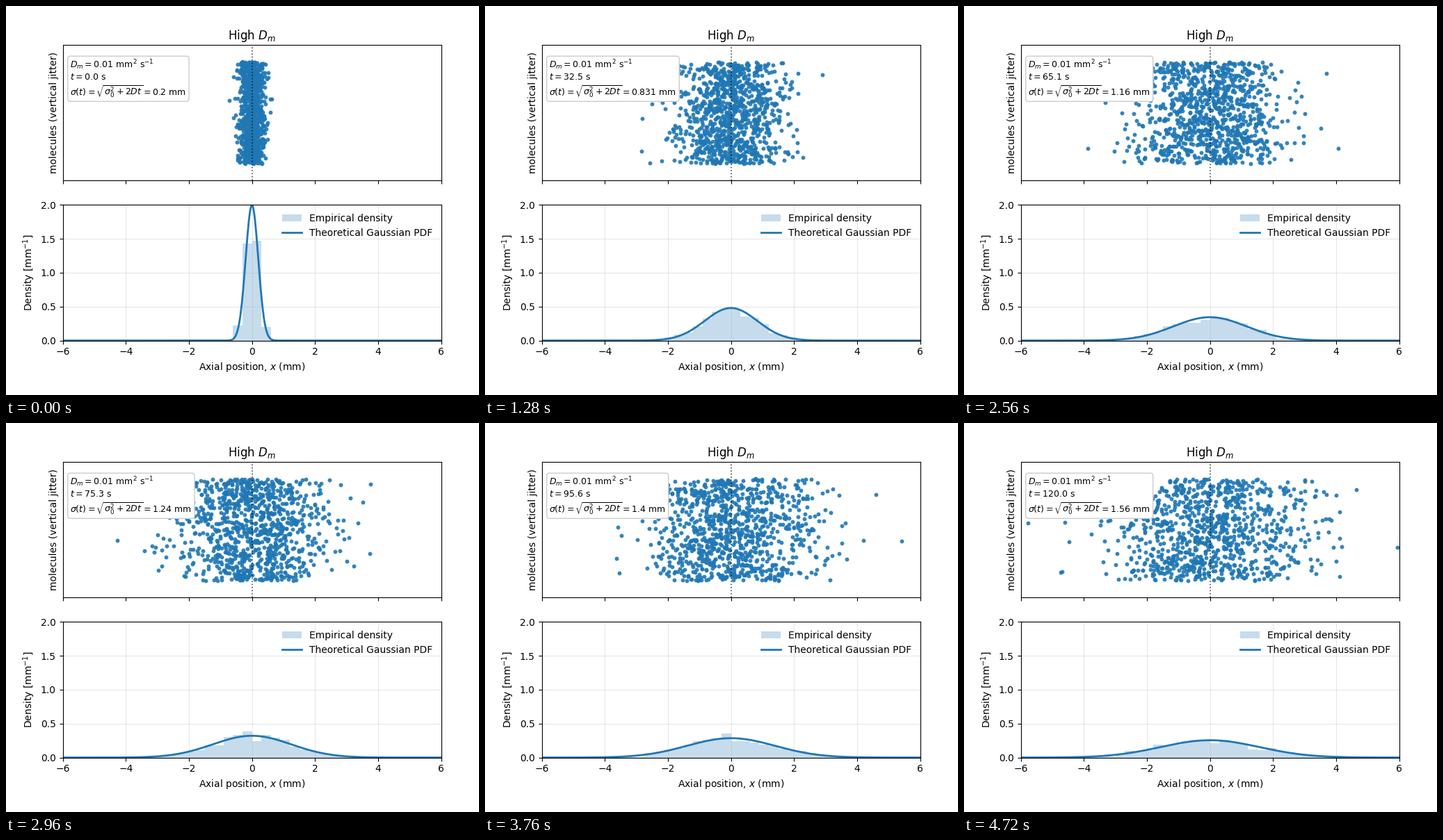
A matplotlib script that plays this animation: 680x560 px, repeating every 4.8 s.

```python
import numpy as np
import matplotlib.pyplot as plt
from matplotlib.animation import FuncAnimation

D = 0.01          # mm^2 / s
SIGMA0 = 0.2      # mm
T_END = 120.0     # s
FRAMES = 60
COUNT = 1000
JITTER = 0.75
COLOR = "tab:blue"

times = np.linspace(0, T_END, FRAMES)
sigmas = np.sqrt(SIGMA0**2 + 2 * D * times)
edges = np.linspace(-6, 6, 41)
grid_x = np.linspace(-6, 6, 601)

# Fresh positions and jitter for every time step, drawn once so loops repeat
rng = np.random.default_rng(42)
clouds = [
    np.column_stack([rng.normal(0, s, COUNT), rng.uniform(-JITTER, JITTER, COUNT)])
    for s in sigmas
]


def gaussian(x, s):
    return np.exp(-x**2 / (2 * s**2)) / (s * np.sqrt(2 * np.pi))


def density(x):
    counts, _ = np.histogram(x, bins=edges)
    return counts / (len(x) * np.diff(edges))


def caption(t, s):
    return (
        f"$D_m = {D:.3g}$ mm$^2$ s$^{{-1}}$\n"
        f"$t = {t:.1f}$ s\n"
        rf"$\sigma(t) = \sqrt{{\sigma_0^2 + 2Dt}} = {s:.3g}$ mm"
    )


fig, (top, low) = plt.subplots(2, 1, figsize=(6.8, 5.6), dpi=100, sharex=True)
fig.subplots_adjust(left=0.12, right=0.92, top=0.9, bottom=0.14, hspace=0.18)

dots = top.scatter(*clouds[0].T, s=18, color=COLOR, alpha=0.9, linewidths=0)
top.axvline(0, color="k", ls=":", lw=1.2, alpha=0.7)
top.set_ylim(-1, 1)
top.set_yticks([])
top.set_ylabel("molecules (vertical jitter)")
top.set_title("High $D_m$")
note = top.text(
    0.02, 0.9, "", transform=top.transAxes, fontsize=9, va="top", ha="left",
    bbox=dict(boxstyle="round,pad=0.3", facecolor="white", edgecolor="0.8"),
)

bars = low.bar(
    edges[:-1], density(clouds[0][:, 0]), width=np.diff(edges), align="edge",
    color=COLOR, alpha=0.25, linewidth=0, label="Empirical density",
)
curve, = low.plot(
    grid_x, gaussian(grid_x, SIGMA0), color=COLOR, lw=2,
    label="Theoretical Gaussian PDF",
)
low.set_xlim(-6, 6)
low.set_ylim(0, 2)
low.set_yticks(np.arange(0, 2.1, 0.5))
low.set_xlabel("Axial position, $x$ (mm)")
low.set_ylabel("Density [mm$^{-1}$]")
low.grid(alpha=0.3)
low.legend(handles=[bars, curve], loc="upper right", frameon=False)


def update(i):
    dots.set_offsets(clouds[i])
    for bar, h in zip(bars, density(clouds[i][:, 0])):
        bar.set_height(h)
    curve.set_ydata(gaussian(grid_x, sigmas[i]))
    note.set_text(caption(times[i], sigmas[i]))
    return dots, curve, note, *bars


anim = FuncAnimation(fig, update, frames=FRAMES, interval=80, repeat=True)
plt.show()
```
